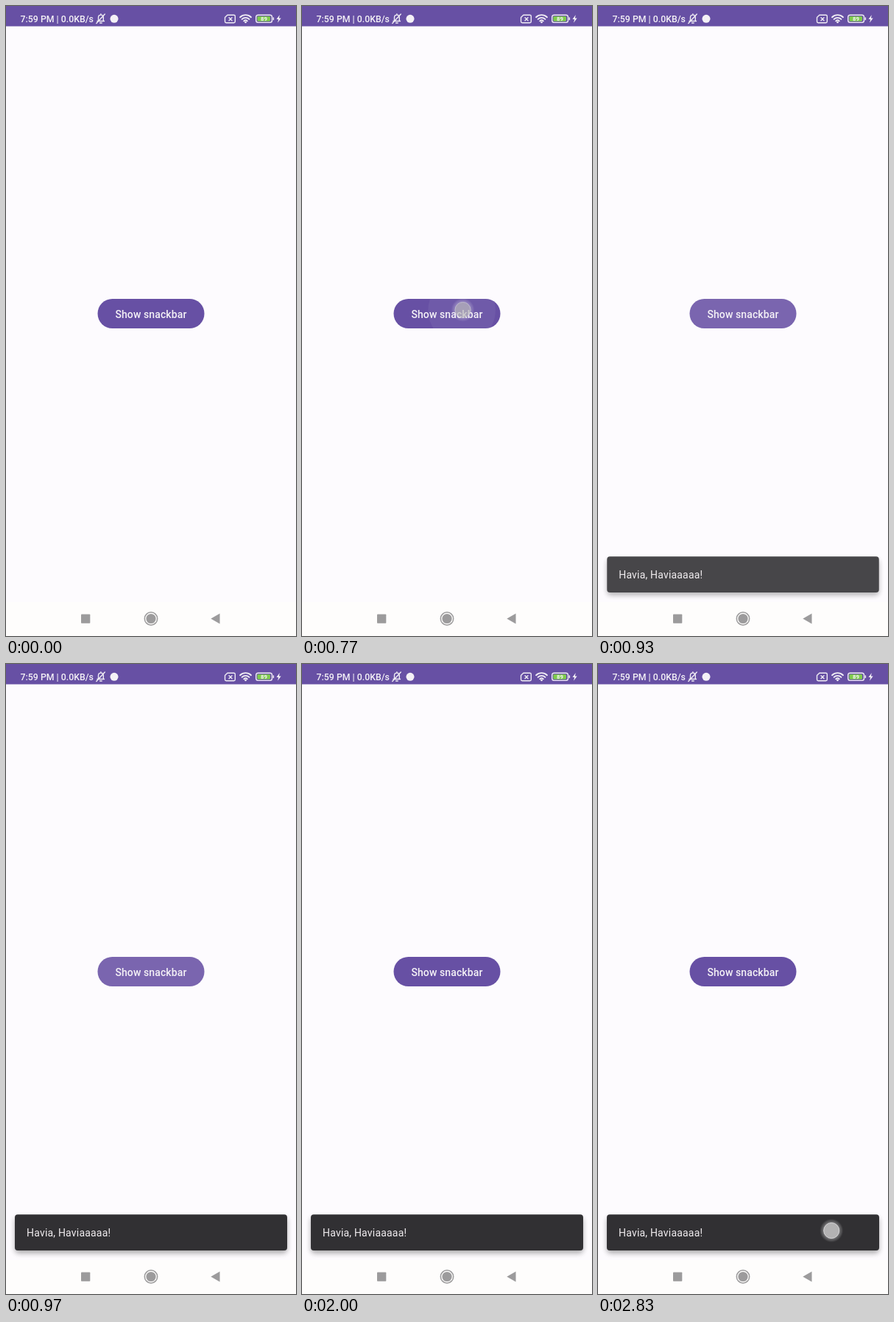
Write an HTML page that moves like this. It is 394 px wide and 854 px high and loops after 2860 ms.

```html
<!DOCTYPE html>
<html lang="en">
<head>
<meta charset="utf-8">
<title>Snackbar demo</title>
<style>
  html, body { margin: 0; width: 100%; height: 100%; overflow: hidden; background: #fdfbfe; }
  svg { display: block; width: 394px; height: 854px; }
  text { font-family: Roboto, "Open Sans", sans-serif; white-space: pre; }
  .ink { fill: #f4f1f6; }
  .line { fill: none; stroke: #f0edf4; stroke-width: 1.4; stroke-linecap: round; stroke-linejoin: round; }
  .wifi { stroke-width: 1.9; }
  .nav { fill: #9c9b9c; }
</style>
</head>
<body>
<svg viewBox="0 0 394 854">
  <defs>
    <radialGradient id="glow">
      <stop offset=".6" stop-color="#fff" stop-opacity=".4"/>
      <stop offset="1" stop-color="#fff" stop-opacity="0"/>
    </radialGradient>
    <filter id="blur" x="-10%" y="-60%" width="120%" height="220%">
      <feGaussianBlur stdDeviation="3.5"/>
    </filter>
    <clipPath id="pill"><rect x="124.5" y="397" width="145" height="40" rx="20"/></clipPath>
  </defs>

  <rect width="394" height="854" fill="#fdfbfe"/>
  <rect y="808" width="394" height="46" fill="#fefdfc"/>

  <!-- status bar -->
  <rect width="394" height="27.5" fill="#6750a4"/>
  <text class="ink" x="19.6" y="21.6" font-size="12.3" font-weight="500">7:59 PM | 0.0KB/s</text>
  <path class="line" d="M124 20.5h9.5M125.5 20v-4.5a3.4 3.4 0 0 1 6.8 0V20M128.900 12v-1.2M127.600 23h2.6M134.300 11l-11.5 12.5"/>
  <circle class="ink" cx="147" cy="17.3" r="5.5"/>
  <path class="line" d="M300.800 12.300h8.800q1.700 0 1.700 1.700v7q0 1.700-1.700 1.700h-10.400q-1.700 0-1.700-1.700v-5.400zM303 15.800l4 4M307 15.800l-4 4"/>
  <path class="line wifi" d="M318 15.200a10.800 10.800 0 0 1 15 0M320.600 17.900a7 7 0 0 1 9.800 0M323.200 20.400a3.400 3.400 0 0 1 4.600 0"/>
  <circle class="ink" cx="325.5" cy="22" r="1.3"/>
  <rect class="line" x="339.700" y="12.200" width="21.800" height="10.200" rx="2.800"/>
  <rect x="341.400" y="13.900" width="17.600" height="6.800" rx="1.400" fill="#7ecb4c"/>
  <text class="ink" x="350.500" y="20.200" font-size="7.800" font-weight="700" text-anchor="middle">89</text>
  <rect class="ink" x="362.600" y="15.300" width="1.500" height="4" rx=".7"/>
  <path class="ink" d="M371.800 12l-4.300 6h2.700l-1.200 4.800 4.700-6.400h-2.800z"/>

  <!-- button -->
  <g clip-path="url(#pill)">
    <rect x="124" y="396" width="146" height="42" fill="#6750a4"/>
    <circle id="ripple" fill="#fff" opacity="0"/>
  </g>
  <text class="ink" x="148.400" y="422.600" font-size="14" font-weight="500" letter-spacing=".1">Show snackbar</text>

  <!-- snackbar -->
  <g id="snack" opacity="0">
    <rect x="12" y="750" width="370" height="48.700" rx="5" opacity=".32" filter="url(#blur)"/>
    <rect x="12" y="746.300" width="370" height="48.700" rx="4" fill="#313033"/>
    <text x="28" y="775.800" font-size="14" letter-spacing=".2" fill="#f0ecef">Havia, Haviaaaaa!</text>
  </g>

  <!-- navigation -->
  <rect class="nav" x="102" y="824.500" width="12.300" height="12.300" rx=".8"/>
  <circle cx="197" cy="830.500" r="8.700" fill="none" stroke="#9c9b9c" stroke-width="1.500"/>
  <circle class="nav" cx="197" cy="830.500" r="6.600"/>
  <path class="nav" d="M278.300 830.500l12.200-7v14z"/>

  <g id="touch" opacity="0">
    <circle r="16" fill="url(#glow)"/>
    <circle r="10.500" fill="#b9b8ba" fill-opacity=".88" stroke="#d6d5d7" stroke-width="1"/>
  </g>
</svg>
<script>
const LOOP = 2860, STEP = 100 / 3;
const $ = id => document.getElementById(id);
const ripple = $('ripple'), snack = $('snack'), touch = $('touch');

const ramp = (t, from, to) => Math.min(1, Math.max(0, (t - from) / (to - from)));
const mix = (a, b, p) => a + (b - a) * p;

function set(el, attrs) {
  for (const name in attrs) el.setAttribute(name, attrs[name]);
}

// cubic-bezier(.4, 0, .2, 1)
function ease(x) {
  let lo = 0, hi = 1;
  for (let i = 0; i < 20; i++) {
    const u = (lo + hi) / 2, v = 1 - u;
    if (1.2 * v * v * u + 0.6 * v * u * u + u ** 3 < x) lo = u; else hi = u;
  }
  return 3 * (1 - lo) * lo * lo + lo ** 3;
}

const taps = [
  { x: 218.5, y: 412, down: 698, up: 720 },
  { x: 308.5, y: 768, down: 2398, up: 2470 },
  { x: 317.2, y: 768, down: 2825, up: 2860 }
];

function drawTouch(t) {
  const tap = taps.filter(p => t >= p.down).pop();
  set(touch, { opacity: tap ? 1 - ramp(t, tap.up, tap.up + 200) : 0 });
  if (tap) set(touch, { transform: `translate(${tap.x} ${tap.y})` });
}

function drawRipple(t) {
  const p = ease(ramp(t, 733, 958));
  set(ripple, {
    cx: mix(218.5, 197, p),
    cy: mix(412, 417, p),
    r: mix(43, 86, p),
    opacity: 0.12 * ramp(t, 733, 808) * (1 - ramp(t, 1000, 1190))
  });
}

function drawSnack(t) {
  const p = ramp(t, 800, 950), s = mix(0.8, 1, ease(p));
  set(snack, {
    opacity: p,
    transform: `translate(197 770.7) scale(${s}) translate(-197 -770.7)`
  });
}

const start = performance.now();
function frame() {
  const now = (performance.now() - start) % LOOP;
  const t = Math.floor((now + 3.4) / STEP) * STEP;
  drawRipple(t);
  drawSnack(t);
  drawTouch(t);
  requestAnimationFrame(frame);
}
frame();
</script>
</body>
</html>
```
